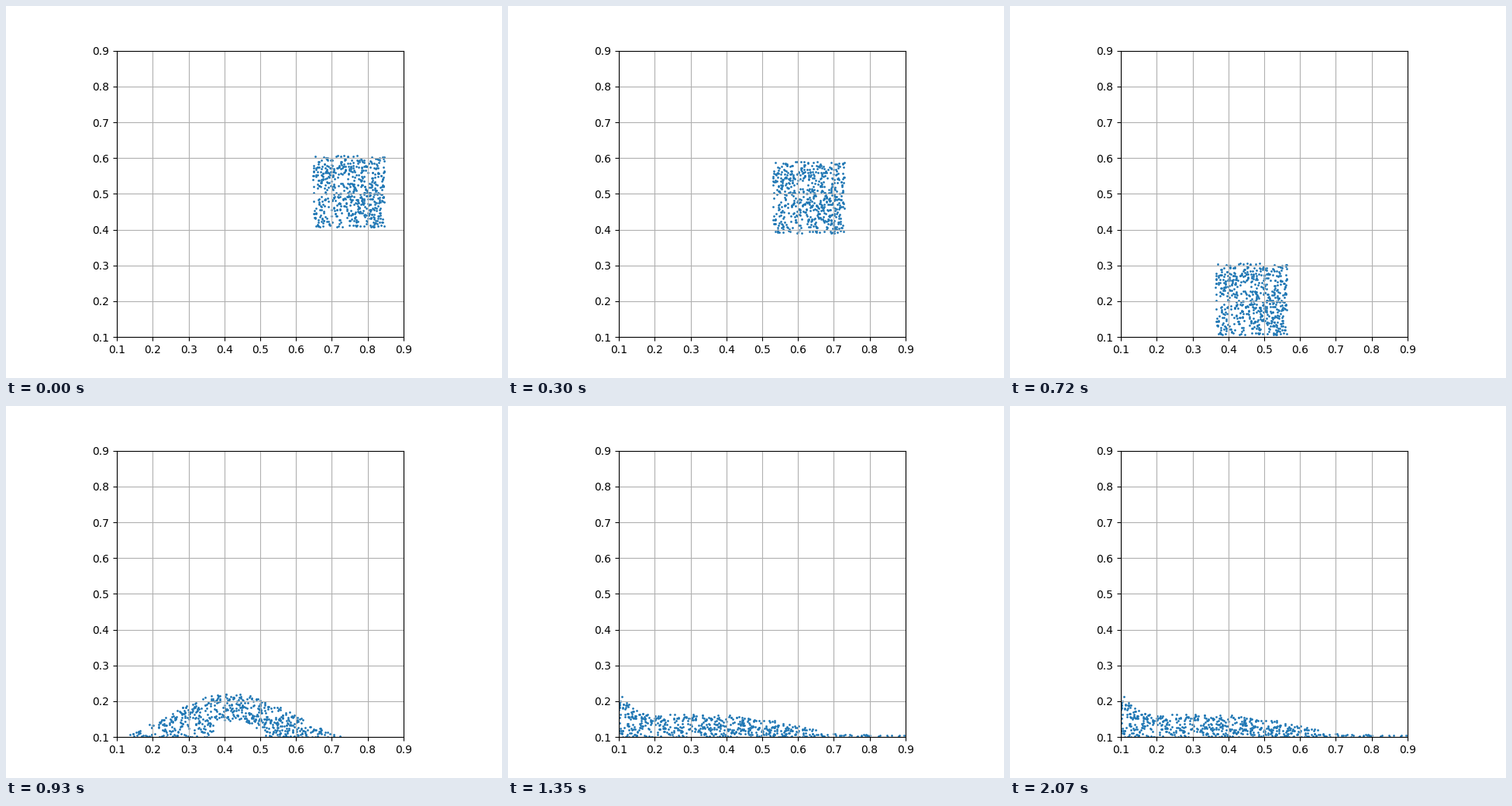
Animation of 640 by 480 pixels, one loop 2.1 s. Source, as a matplotlib script:

```python
import numpy as np
import matplotlib.pyplot as plt
from matplotlib.animation import FuncAnimation

FRAMES, INTERVAL = 70, 30
LO, HI = 0.1, 0.9
SIDE = 0.2
START = np.array([0.647, 0.407])
VEL = np.array([-0.0118, 0.00616])
GRAVITY = np.array([0, -0.001558])
IMPACT, SPLASH, REST, PEAK, END = 24, 31, 39, 48, 69

rng = np.random.default_rng(0)
unit = rng.random((600, 2))
u, v = unit.T


def flight(t):
    """Block of particles in free fall."""
    return START + SIDE * unit + VEL * t + GRAVITY * t * t / 2


def floor(x):
    return np.full_like(x, LO)


def mound(x):
    phase = np.clip((x - 0.42) / 0.32, -1, 1) * np.pi / 2
    return LO + 0.122 * np.abs(np.cos(phase)) ** 1.5


def arch(x):
    phase = np.clip((x - 0.435) / 0.17, -0.5, 0.5) * np.pi
    return LO + 0.05 * np.cos(phase)


def layer(wall):
    """Flat layer with a slope to the right and a heap at the left wall."""
    def top(x):
        slope = 0.058 / (1 + np.exp((x - 0.59) / 0.06))
        return 0.105 + slope + wall * np.exp(-((x - LO) / 0.043) ** 2)
    return top


def columns(top, low):
    """Horizontal positions that fill the area between two outlines evenly."""
    x = np.linspace(LO, HI, 801)
    area = np.cumsum(np.maximum(top(x) - low(x), 0) + 1e-6)
    return np.interp(u, area / area[-1], x)


def stack(x, top, low):
    fill = np.clip((v - 0.04) / 0.96, 0, 1)
    return np.column_stack([x, low(x) + fill * (top(x) - low(x))])


rest_x = columns(layer(0.055), floor)
block = flight(IMPACT)
splash = stack(columns(mound, arch), mound, arch)
rest, peak, end = (stack(rest_x, layer(wall), floor)
                   for wall in (0.046, 0.057, 0.053))

# The base is pushed sideways on impact while the top keeps falling.
vx, vy = VEL + GRAVITY * IMPACT
hit = np.column_stack([vx + 0.08 * (u - 0.5) * (1 - v), vy * v])
slide = (rest - block) / (REST - IMPACT)
still = np.zeros_like(unit)

keys = [(IMPACT, block, hit), (SPLASH, splash, slide),
        (REST, rest, still), (PEAK, peak, still), (END, end, still)]


def hermite(t, start, stop):
    (t0, p0, v0), (t1, p1, v1) = start, stop
    span = t1 - t0
    s = (t - t0) / span
    ease = s * s * (3 - 2 * s)
    return p0 + (p1 - p0) * ease + span * s * (1 - s) * ((1 - s) * v0 - s * v1)


def particles(t):
    if t <= IMPACT:
        return flight(t)
    start, stop = next(pair for pair in zip(keys, keys[1:]) if t <= pair[1][0])
    x, y = hermite(t, start, stop).T
    x = LO + np.abs(x - LO)  # bounce off the left wall
    return np.column_stack([np.minimum(x, HI), np.maximum(y, LO)])


fig, ax = plt.subplots(figsize=(6.4, 4.8), dpi=100)
ax.set_aspect("equal")
ticks = np.linspace(LO, HI, 9)
ax.set(xlim=(LO, HI), ylim=(LO, HI), xticks=ticks, yticks=ticks)
ax.grid(True)
dots = ax.scatter(*particles(0).T, s=1, linewidths=1, color="C0")


def update(frame):
    dots.set_offsets(particles(frame))
    return (dots,)


anim = FuncAnimation(fig, update, frames=FRAMES, interval=INTERVAL,
                     repeat=True, repeat_delay=0, blit=False)
plt.show()
```
